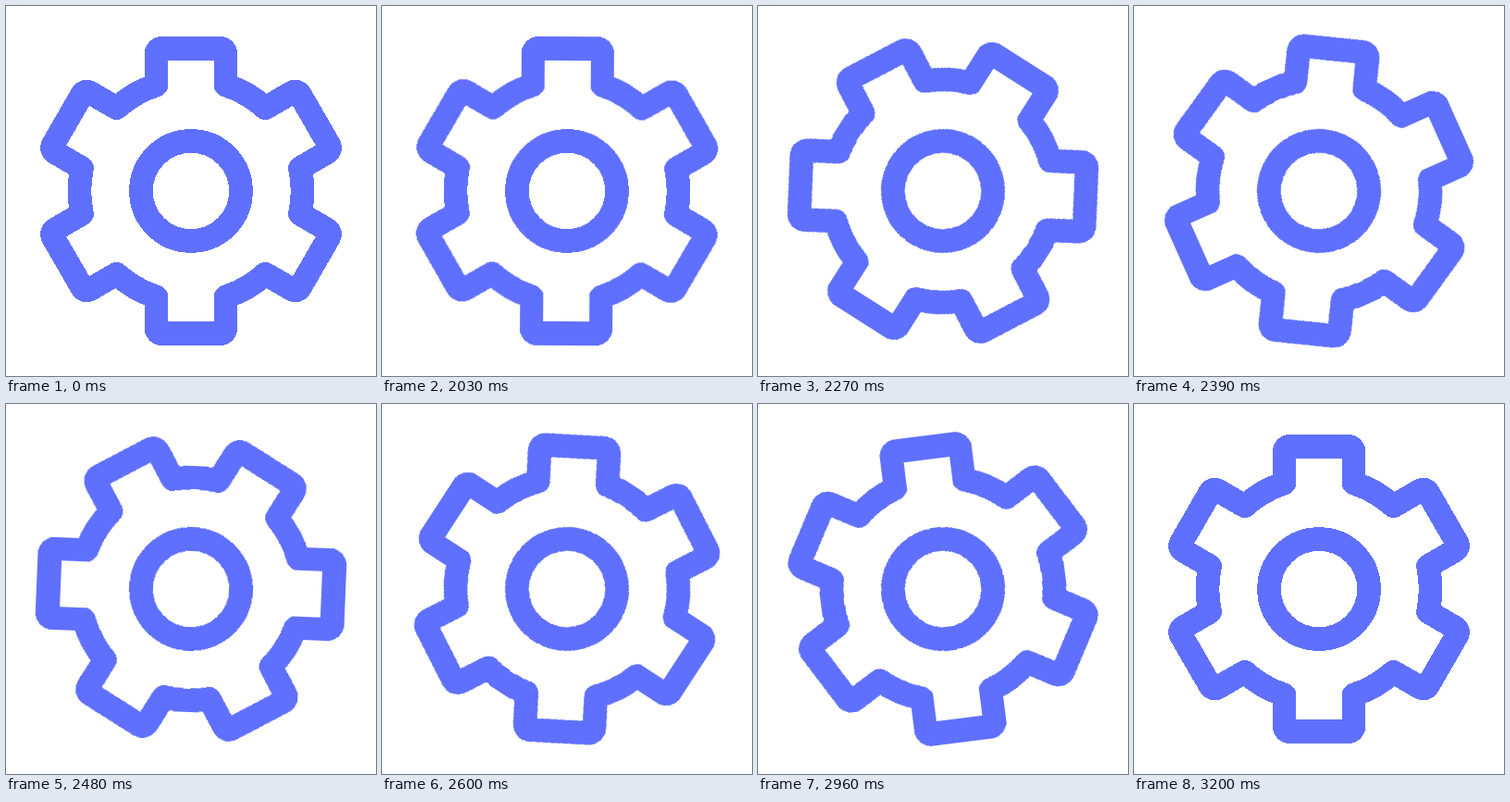
An HTML page for the animation above (3.23 s loop, 400 by 400 pixels).

```html
<!DOCTYPE html>
<html lang="en">
<head>
<meta charset="utf-8">
<title>Turning gear</title>
<style>
  html, body { margin: 0; width: 100%; height: 100%; overflow: hidden; background: #fff; }
  svg { display: block; width: 100vw; height: 100vh; }
  #gear { fill: none; stroke: #5f70ff; stroke-width: 25.6; stroke-linejoin: round; shape-rendering: crispEdges; }
</style>
</head>
<body>
<svg viewBox="-200 -200 400 400">
  <g id="gear">
    <path id="rim"/>
    <circle r="54"/>
  </g>
</svg>
<script>
  const RING = 120.5, TIP = 154.2, HALF = 37.5, CORNER = 6, TEETH = 6;
  const LOOP = 3230, START = 2000, SPIN = 1200, STEP = 30, TURN = 180;

  // Outline: one tooth repeated around the ring
  function rimPath() {
    const base = Math.sqrt(RING * RING - HALF * HALF);
    let d = '';
    for (let i = 0; i < TEETH; i++) {
      const a = i * 2 * Math.PI / TEETH, c = Math.cos(a), s = Math.sin(a);
      const at = (x, y) => `${(x * c - y * s).toFixed(2)} ${(x * s + y * c).toFixed(2)}`;
      const arc = (r, p) => `A${r} ${r} 0 0 1 ${p}`;
      const foot = at(-HALF, -base);
      d += (i ? arc(RING, foot) : 'M' + foot)
        + 'L' + at(-HALF, CORNER - TIP) + arc(CORNER, at(CORNER - HALF, -TIP))
        + 'L' + at(HALF - CORNER, -TIP) + arc(CORNER, at(HALF, CORNER - TIP))
        + 'L' + at(HALF, -base);
      if (i === TEETH - 1) d += arc(RING, `${-HALF} ${-base.toFixed(2)}`) + 'Z';
    }
    return d;
  }

  // Cubic bezier easing (.333, 0, .382, 1)
  function ease(x) {
    if (x <= 0 || x >= 1) return x <= 0 ? 0 : 1;
    let lo = 0, hi = 1;
    for (let i = 0; i < 40; i++) {
      const t = (lo + hi) / 2, u = 1 - t;
      if (3 * u * u * t * 0.333 + 3 * u * t * t * 0.382 + t * t * t < x) lo = t;
      else hi = t;
    }
    return lo * lo * (3 - 2 * lo);
  }

  document.getElementById('rim').setAttribute('d', rimPath());

  // Rest, then a half turn in held steps
  const frames = [{ offset: 0, transform: 'rotate(0deg)', easing: 'steps(1, end)' }];
  for (let t = STEP; t <= SPIN; t += STEP) {
    frames.push({
      offset: (START + t - 0.5) / LOOP,
      transform: `rotate(${(TURN * ease(t / SPIN)).toFixed(3)}deg)`,
      easing: 'steps(1, end)'
    });
  }
  frames.push({ offset: 1, transform: `rotate(${TURN}deg)` });
  document.getElementById('gear').animate(frames, { duration: LOOP, iterations: Infinity });
</script>
</body>
</html>
```
